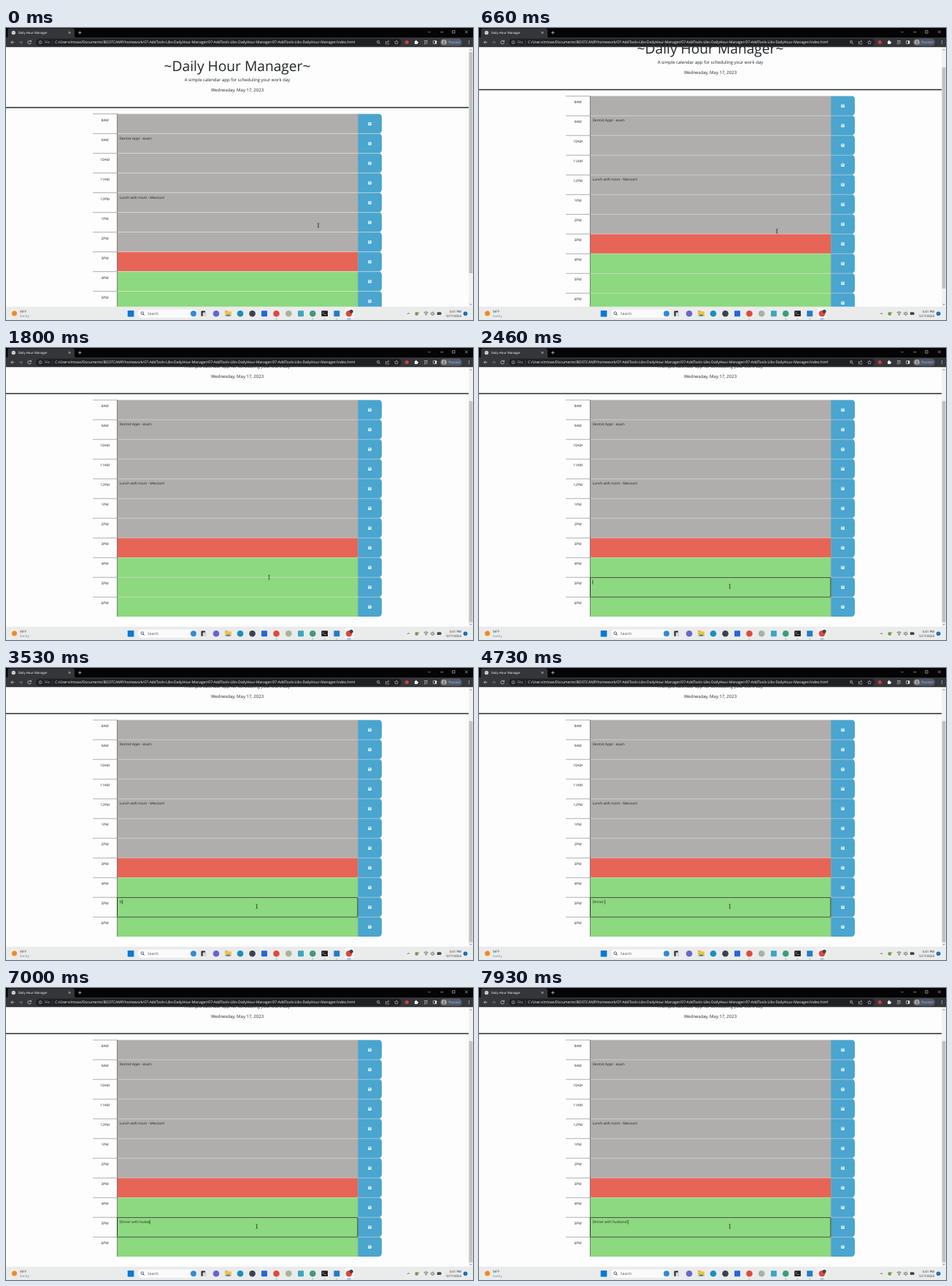
These frames come from a looping animation (640x400 px, 8000 ms). An HTML page:

```html
<!DOCTYPE html>
<html lang="en">
<head>
<meta charset="utf-8">
<title>Daily Hour Manager</title>
<style>
  html, body { margin: 0; width: 100%; height: 100%; overflow: hidden; background: #fdfdfd; }
  svg { display: block; width: 100vw; height: 100vh; }
  text { font-family: "Open Sans", "Noto Sans", sans-serif; text-rendering: geometricPrecision; white-space: pre; }
</style>
</head>
<body>
<svg id="stage" viewBox="0 0 640 400">
  <defs>
    <clipPath id="view"><rect y="26" width="634" height="356"/></clipPath>
  </defs>
</svg>
<script>
const LOOP = 8000, FRAME = 1000 / 15;
const VIEW_TOP = 26, ROW_TOP = 117.5, ROW_H = 27, FOCUS_ROW = 9;
const MAX_SCROLL = 46.5, NOTCH = 33.3, FOCUS_AT = 2400;
const stage = document.getElementById('stage');

function add(parent, tag, attrs, content) {
  const node = document.createElementNS('http://www.w3.org/2000/svg', tag);
  for (const key in attrs) node.setAttribute(key, attrs[key]);
  if (content !== undefined) node.textContent = content;
  parent.appendChild(node);
  return node;
}
const rect = (p, x, y, width, height, fill, rx = 0) => add(p, 'rect', { x, y, width, height, fill, rx });
const dot = (p, cx, cy, r, fill) => add(p, 'circle', { cx, cy, r, fill });
const line = (p, d, stroke, width = 0.7) =>
  add(p, 'path', { d, stroke, 'stroke-width': width, fill: 'none' });
const label = (p, x, y, size, fill, content, anchor = 'start') =>
  add(p, 'text', { x, y, 'font-size': size, fill, 'text-anchor': anchor }, content);
const group = (p, attrs = {}) => add(p, 'g', attrs);

// Page
rect(stage, 0, VIEW_TOP, 640, 356, '#fdfdfd');
const page = group(group(stage, { 'clip-path': 'url(#view)' }));
const ink = '#222529';
label(page, 317, 59.4, 19.2, ink, '~Daily Hour Manager~', 'middle');
label(page, 317, 73, 6, ink, 'A simple calendar app for scheduling your work day', 'middle');
label(page, 317, 87, 6, ink, 'Wednesday, May 17, 2023', 'middle');
rect(page, 0, 108.2, 634, 1.5, '#23292e');

const notes = { 1: 'Dentist Appt - exam', 4: 'Lunch with mom - Mexican!' };
function addRow(i) {
  const y = ROW_TOP + i * ROW_H;
  const hour = (i + 7) % 12 + 1 + (i < 4 ? 'AM' : 'PM');
  const fill = i < 7 ? '#b0aeac' : i === 7 ? '#e66557' : '#8cd97f';
  rect(page, 152.5, y, 329.8, ROW_H, fill);
  add(page, 'path', {
    d: `M482.5 ${y}h28a4.5 4.5 0 0 1 4.5 4.5v18a4.5 4.5 0 0 1 -4.5 4.5h-28z`, fill: '#4aa5cf'
  });
  line(page, `M152.5 ${y + 0.2}H511`, '#e4e4e2', 0.55);
  line(page, `M119 ${y + 0.2}H152`, '#777', 0.6);
  line(page, `M152.4 ${y}v${ROW_H}`, '#333', 0.6);
  line(page, `M482.4 ${y}v${ROW_H}`, '#4e7789', 0.4);
  label(page, 135.5, y + 10.3, 4.8, ink, hour, 'middle');
  if (notes[i]) label(page, 155.6, y + 8.2, 4.8, '#222', notes[i]);
  rect(page, 496.3, y + 11.5, 4.4, 4.4, '#eef8fc', 0.7);
  rect(page, 497.1, y + 12.2, 2.5, 1, '#4aa5cf');
  dot(page, 498.5, y + 14.6, 0.65, '#4aa5cf');
}
for (let i = 0; i < 11; i++) addRow(i);

const focusY = ROW_TOP + FOCUS_ROW * ROW_H;
const focus = group(page);
add(focus, 'rect', {
  x: 152.5, y: focusY + 0.4, width: 329.4, height: ROW_H - 0.2, rx: 0.5,
  fill: 'none', stroke: '#14200f', 'stroke-width': 0.75
});
const typed = label(focus, 155.6, focusY + 8.2, 4.8, '#222', '');
const caret = rect(focus, 0, focusY + 3.6, 0.6, 6, '#111');

// Scrollbar
rect(stage, 634, VIEW_TOP, 6, 356, '#f1f1f1');
const thumb = rect(stage, 634.6, 33, 4.8, 303, '#c1c1c1');
line(stage, 'M635.6 30.6l1.4 -1.4l1.4 1.4M635.6 378l1.4 1.4l1.4 -1.4', '#666', 0.8);

// Browser frame
const pale = '#dcdddf', pane = '#35363a';
rect(stage, 0, 0, 640, 14, '#050505');
add(stage, 'path', { d: 'M0 13.5q2.5 0 2.5 -2.5V3q0 -2.5 2.5 -2.5H91.5q2.5 0 2.5 2.5V11q0 2.5 2.5 2.5z', fill: pane });
rect(stage, 0, 13, 640, 13.2, pane);
dot(stage, 10.3, 6.4, 2.6, '#e0e1e3');
line(stage, 'M8 5.8h2l1 1.4l-1 1.5M10.5 4.2l1.8 1.2', '#707276', 0.6);
label(stage, 16.7, 8, 4.3, '#fff', 'Daily Hour Manager');
line(stage, 'M85.6 5l2.8 2.8m0 -2.8l-2.8 2.8M99 6.4h4.4m-2.2 -2.2v4.4', pale);
line(stage, 'M578.5 4.8l1.5 1.5l1.5 -1.5M595.5 5.6h3.8M611.7 3.7h3.4v3.4h-3.4zM629.2 3.7l3.5 3.5m0 -3.5l-3.5 3.5', pale, 0.6);
line(stage, 'M11.4 19.6H6.8m2.2 -2.2l-2.2 2.2l2.2 2.2', pale);
line(stage, 'M17.8 19.6h4.6m-2.2 -2.2l2.2 2.2l-2.2 2.2', '#85878a');
line(stage, 'M34 18.3a2.3 2.3 0 1 0 .4 1.7M34.4 16.8v1.9h-1.9', pale);
rect(stage, 41, 14.6, 501, 10, '#202124', 5);
add(stage, 'circle', { cx: 47, cy: 19.6, r: 2, fill: 'none', stroke: pale, 'stroke-width': 0.5 });
line(stage, 'M47 19.3v1.4M47 18.2v.5', pale, 0.5);
label(stage, 52.7, 21.3, 4.7, '#b5b7ba', 'File');
rect(stage, 63.5, 17, 0.4, 5, '#66686c');
const folder = '07-AddTools-Libs-DailyHour-Manager/';
label(stage, 67.3, 21.3, 4.98, '#fff', 'C:/Users/mtove/Documents/BOOTCAMP/homework/' + folder.repeat(3) + 'index.html');
add(stage, 'circle', { cx: 510, cy: 19, r: 1.6, fill: 'none', stroke: pale, 'stroke-width': 0.6 });
line(stage, 'M511.2 20.2l1.6 1.6', pale);
line(stage, 'M521.5 18.5h-1v3.5h4.3v-1.5M521.8 20.3q0 -2.2 2.8 -2.2m-1.2 -1.3l1.4 1.3l-1.4 1.3', pale, 0.55);
line(stage, 'M535 17l.8 1.7l1.8 .2l-1.3 1.3l.3 1.8l-1.6 -.9l-1.6 .9l.3 -1.8l-1.3 -1.3l1.8 -.2z', pale, 0.5);
dot(stage, 549.3, 19.6, 2.5, '#d93d35');
rect(stage, 560, 18, 4, 4, '#eee', 0.5);
dot(stage, 562, 17.7, 0.9, '#eee');
dot(stage, 564.2, 20, 0.9, '#eee');
line(stage, 'M573 17.6h4.8M573 19.6h2.5M573 21.6h2.5M577 18.7v3m-1 -.6', pale, 0.7);
rect(stage, 585.4, 17.2, 4.8, 4.6, '#e8e8e8', 0.5);
rect(stage, 586, 17.8, 2, 3.4, pane);
rect(stage, 595, 14.6, 30, 10, '#525967', 5);
dot(stage, 600.2, 19.6, 3.5, '#b9aea5');
dot(stage, 600.2, 18.8, 1.2, '#6d5d55');
add(stage, 'path', { d: 'M598 22.2q2.2 -3.4 4.4 0z', fill: '#6d5d55' });
label(stage, 606.5, 21.2, 4.5, '#a9c4f1', 'Paused');
for (const y of [17.6, 19.6, 21.6]) dot(stage, 634.5, y, 0.55, pale);

// Taskbar
rect(stage, 0, 381.7, 640, 18.3, '#eaecec');
dot(stage, 11.5, 391, 3.5, '#f08a24');
label(stage, 19, 389.6, 4.4, '#333', '98°F');
label(stage, 19, 395.8, 4.4, '#737a80', 'Sunny');
rect(stage, 166.7, 387, 8.6, 8.6, '#0a78d4');
rect(stage, 180.5, 385.4, 82, 11.6, '#fafafa', 5.8);
add(stage, 'circle', { cx: 186.8, cy: 390.6, r: 1.8, fill: 'none', stroke: '#222', 'stroke-width': 0.7 });
line(stage, 'M188.1 392l1.5 1.6', '#222', 0.8);
label(stage, 194, 393, 4.9, '#555', 'Search');
dot(stage, 257, 391.2, 4, '#3389d2');

rect(stage, 267.5, 387.6, 5.5, 5.5, '#222');
rect(stage, 269.5, 389.5, 5, 5.3, '#d3d6d9');
rect(stage, 267.5, 392.8, 2, 2, '#222');
rect(stage, 300, 387.3, 4, 3, '#d89b20', 0.6);
rect(stage, 300, 388.3, 9, 6.7, '#f5c142', 0.6);
rect(stage, 302, 392.4, 5, 2.6, '#3f91cf', 0.4);
rect(stage, 464.5, 383.8, 12, 14, '#f7f8f8', 1.5);
const discs = [[288, '#6767c7'], [321, '#1b8ebd'], [337.6, '#39434a'], [370.5, '#df493b'], [387.3, '#a3b3a0'], [420.3, '#3e9b79'], [470, '#df493b']];
for (const [x, color] of discs) dot(stage, x, 391.2, 4.3, color);
const tiles = [[354, '#2467dc'], [404, '#41a4bd'], [453.3, '#227fc4']];
for (const [x, color] of tiles) rect(stage, x - 4, 387.2, 8, 8, color, 0.7);
rect(stage, 432.3, 387.3, 8.7, 7.8, '#222', 0.8);
line(stage, 'M434 389.3l1.3 1.2l-1.3 1.2M436 392.5h2.5', '#eee', 0.6);
dot(stage, 473.2, 388.3, 2.5, '#48423f');
for (const x of [370.5, 420.3, 436.6, 453.3]) rect(stage, x - 1, 398, 2, 0.8, '#858c91', 0.4);
rect(stage, 467.5, 398, 5, 0.8, '#1776c4', 0.4);

line(stage, 'M549.8 392l1.7 -1.7l1.7 1.7', '#333');
dot(stage, 562.8, 391.5, 2.4, '#6f9b58');
dot(stage, 565, 390, 1.3, '#e2af37');
line(stage, 'M572.7 390q3 -2.8 6 0M573.9 391.4q1.8 -1.6 3.6 0', '#333', 0.7);
dot(stage, 575.7, 392.8, 0.8, '#333');
line(stage, 'M582.5 390.2h1l1.6 -1.4v5l-1.6 -1.4h-1zM586.5 389.6q1.4 1.7 0 3.4', '#333', 0.6);
rect(stage, 590.8, 389.2, 5.4, 3.8, '#444', 0.7);
rect(stage, 596.3, 390.3, 0.7, 1.6, '#444');
label(stage, 624, 389.6, 4.4, '#222', '3:41 PM', 'end');
label(stage, 624, 395.8, 4.4, '#222', '5/17/2023', 'end');
dot(stage, 629.6, 391.2, 2.8, '#0c65b5');
label(stage, 629.6, 392.6, 3.6, '#fff', '1', 'middle');

const pointer = group(stage);
line(pointer, 'M-1.4 -3q1.4 0 1.4 .8V2.2q0 .8 -1.4 .8M1.4 -3q-1.4 0 -1.4 .8V2.2q0 .8 1.4 .8', '#222', 0.5);

// Motion
const moves = [
  [0, 428, 270.3], [460, 409, 277.7], [660, 408.3, 278.2], [1130, 407.3, 279], [1530, 407.3, 279],
  [1800, 360.5, 314], [2000, 345, 325.6], [2300, 345, 325.6], [2460, 343.7, 326.6], [LOOP, 343.7, 326.6]
];
const message = 'Dinner with husband ';
const keys = [3460, 3730, 4000, 4130, 4260, 4430, 4660, 4800, 4930, 5060, 5200, 5300,
  6060, 6260, 6660, 6800, 7000, 7200, 7400, 7700];

function easeOut(t, start, length) {
  const p = Math.min(1, Math.max(0, (t - start) / length));
  return 1 - (1 - p) ** 2;
}
function pointerAt(t) {
  const i = moves.findIndex((m, n) => n > 0 && t <= m[0]);
  const [t0, x0, y0] = moves[i - 1], [t1, x1, y1] = moves[i];
  const p = (t - t0) / (t1 - t0);
  return [x0 + (x1 - x0) * p, y0 + (y1 - y0) * p];
}
function draw(t) {
  const scroll = NOTCH * easeOut(t, 586.7, 165) + (MAX_SCROLL - NOTCH) * easeOut(t, 1364, 165);
  page.setAttribute('transform', `translate(0 ${-scroll})`);
  thumb.setAttribute('y', 33 + scroll * 0.855);
  pointer.setAttribute('transform', `translate(${pointerAt(t)})`);

  focus.setAttribute('visibility', t >= FOCUS_AT ? 'visible' : 'hidden');
  const count = keys.filter(k => k <= t).length;
  typed.textContent = message.slice(0, count);
  const since = t - (count ? keys[count - 1] : FOCUS_AT);
  const lit = t >= FOCUS_AT && since % 1000 < 500;
  caret.setAttribute('visibility', lit ? 'visible' : 'hidden');
  caret.setAttribute('x', 155.6 + (count ? typed.getComputedTextLength() : 0));
}

// The screen updates 15 times a second, with times cut to 10 ms.
const origin = performance.now();
function tick() {
  const t = (performance.now() - origin) % LOOP;
  draw(Math.min(LOOP, Math.floor((t + 7) / FRAME) * FRAME));
  requestAnimationFrame(tick);
}
tick();
</script>
</body>
</html>
```
